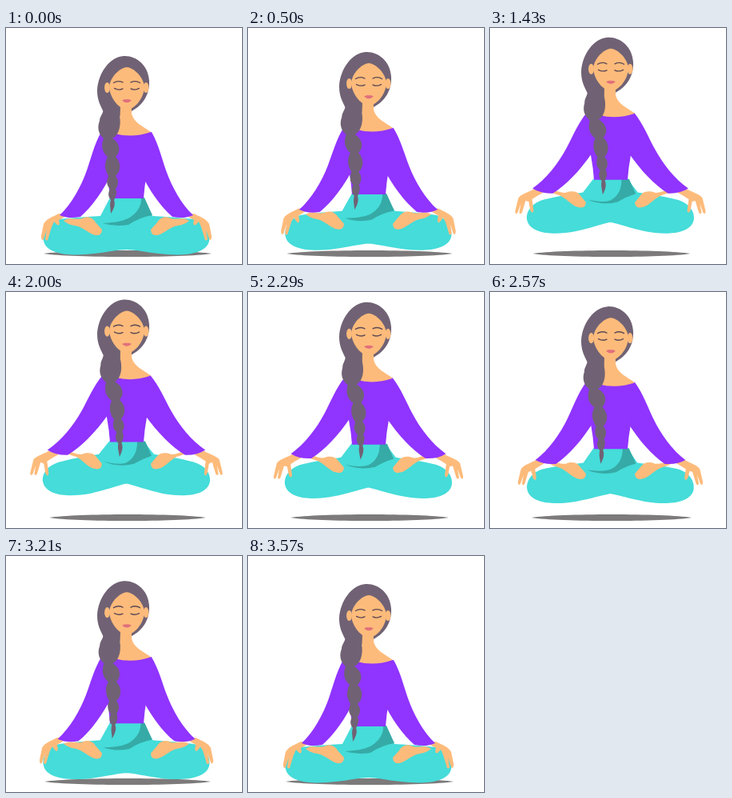
Write an HTML page that moves like this. It is 295 by 295 pixels and loops after 3.64 s.

```html
<!DOCTYPE html>
<html lang="en">
<head>
<meta charset="utf-8">
<title>Levitating meditation</title>
<style>
html, body { margin: 0; width: 100%; height: 100%; overflow: hidden; background: #fff; }
svg { display: block; width: 100vw; height: 100vh; }
.skin { fill: #fdbb7b; }
.hair { fill: #706274; }
.shirt { fill: #9034ff; }
.pants { fill: #45dcd9; }
.fold { fill: #36aaa6; }
.line { fill: none; stroke: #5c4a55; stroke-width: 1.4; stroke-linecap: round; }
</style>
</head>
<body>
<svg viewBox="0 0 295 295">
  <defs>
    <path id="leg" class="pants"/>
    <path id="foot" class="skin"/>
    <path id="hand" class="skin"/>
    <path id="sleeve" class="shirt" d="M119 130C110 146 106 164 101 178C94 198 82 220 67 234Q78 239 93 236C108 223 122 203 134 178L150 140Z"/>
  </defs>
  <path id="shadow" fill="#7c7a7b" d="M-105 0C-70 -5.4 70 -5.4 105 0C70 5.4 -70 5.4 -105 0Z"/>
  <g id="body">
    <use href="#leg"/>
    <use href="#leg" class="flip"/>
    <path id="fold" class="fold"/>
    <use href="#foot"/>
    <use href="#foot" class="flip"/>
    <use href="#hand"/>
    <use href="#hand" class="flip"/>
    <use href="#sleeve"/>
    <use href="#sleeve" class="flip"/>
    <path class="shirt" d="M120 130Q150 126 181 130L176 182Q173 198 172 213H130Q129 198 126 182Z"/>
    <path class="hair" d="M147 35C162 34 178 46 179 66C180 84 170 97 157 104L140 112L122 105C118 97 114 90 114 78C115 56 130 36 147 35Z"/>
    <path class="skin" d="M143 92H157V107C160 119 172 123 181 130Q158 138 136 132C142 124 143 112 143 92Z"/>
    <ellipse class="skin" cx="126.500" cy="74.500" rx="3.4" ry="6.6"/>
    <ellipse class="skin" cx="175" cy="74.500" rx="3.4" ry="6.6"/>
    <path id="braid" class="hair" d="M122 98C123 106 117 110 117 116C113 126 117 134 122 138C118 148 121 156 127 161C122 170 124 178 128 185C125 192 126 197 130 201C127 207 128 211 131 215C129 221 131 226 131 232C135 226 137 220 135 215C138 210 139 205 137 201C141 196 141 190 137 185C144 179 144 168 137 161C143 156 144 145 133 138C142 134 144 120 142 110L142 100Z"/>
    <path class="skin" d="M151 49C142 50 130 61 129 74C130 88 142 102 151 102C160 102 172 89 173 74C172 61 160 50 151 49Z"/>
    <path class="line" d="M134.500 68.500Q140 65 146 68M156 68Q162 65 167.500 68.500"/>
    <path class="line" d="M135.500 75.500Q141 78.500 146 76M156 76Q161 78.500 166.500 75.500"/>
    <path fill="#e0707c" d="M145 90.500Q148.500 88.300 151 89.300Q153.500 88.300 157 90.500Q151 96 145 90.500Z"/>
  </g>
</svg>
<script>
const STEP = 70, COUNT = 52, LIFT = 26;
const $ = id => document.getElementById(id);

// Each shape morphs from the seated pose to the floating pose.
const poses = {
  leg: [
    'M151 212H130L118 235C100 236 82 237 66 239C50 243 45 257 47 266C51 285 86 285 110 282C128 280 140 277 151 277Z',
    'M151 212H129L116 228C100 231 84 233 70 237C52 241 45 252 46 262C50 283 86 281 106 277C124 273 138 268 151 264.5Z'
  ],
  fold: [
    'M169 212L173 212L183 234Q166 237 153 246Q136 249 121 244Q146 243 156 236Q170 226 169 212Z',
    'M164 212L174 212L182 230Q170 234 160 240Q140 245 122 237Q140 242 150 239Q164 232 164 212Z'
  ],
  foot: [
    'M72 241C79 236 87 240 95 238C103 234 109 238 112 243L120 252Q120 260 112 259C104 258 96 248 86 247Q78 246 72 241Z',
    'M73 225C80 222 87 229 95 228C103 225 109 227 112 230L120 240Q119 248 112 246C104 246 98 237 88 231Q80 229 73 225Z'
  ],
  hand: [
    'M66 232C58 236 50 239 47 245L44 260Q44 267 47 264L51 252L49 264Q52 268 53 262L57 249L60 242L62 244Q66 249 67 244L66 240L70 238L76 234Z',
    'M53 224C45 229 37 230 34 235L30 251Q30 256 33 253L37 242L35 253Q38 256 39 251L43 238L47 240L49 252Q52 258 53 252L51 237L57 233L66 228Z'
  ]
};
const NUM = /-?\d+(\.\d+)?/g;

function mix([a, b], k) {
  const to = b.match(NUM);
  let i = 0;
  return a.replace(NUM, n => (+n + (to[i++] - n) * k).toFixed(2));
}

for (const el of document.querySelectorAll('.flip'))
  el.setAttribute('transform', 'translate(301 0) scale(-1 1)');

function draw(now) {
  const i = Math.floor(now / STEP) % COUNT;
  const k = (1 - Math.cos(2 * Math.PI * (i + 0.5) / COUNT)) / 2;
  for (const id in poses) $(id).setAttribute('d', mix(poses[id], k));
  $('body').setAttribute('transform', `translate(0 ${-LIFT * k})`);
  $('sleeve').setAttribute('transform', `rotate(${10 * k} 125 140)`);
  $('braid').setAttribute('transform', `rotate(${-4.8 * k} 130 100)`);
  $('shadow').setAttribute('transform', `translate(152 282) scale(${1 - 0.07 * k} 1)`);
}

const start = performance.now();
function tick() {
  draw(performance.now() - start);
  requestAnimationFrame(tick);
}
tick();
</script>
</body>
</html>
```
